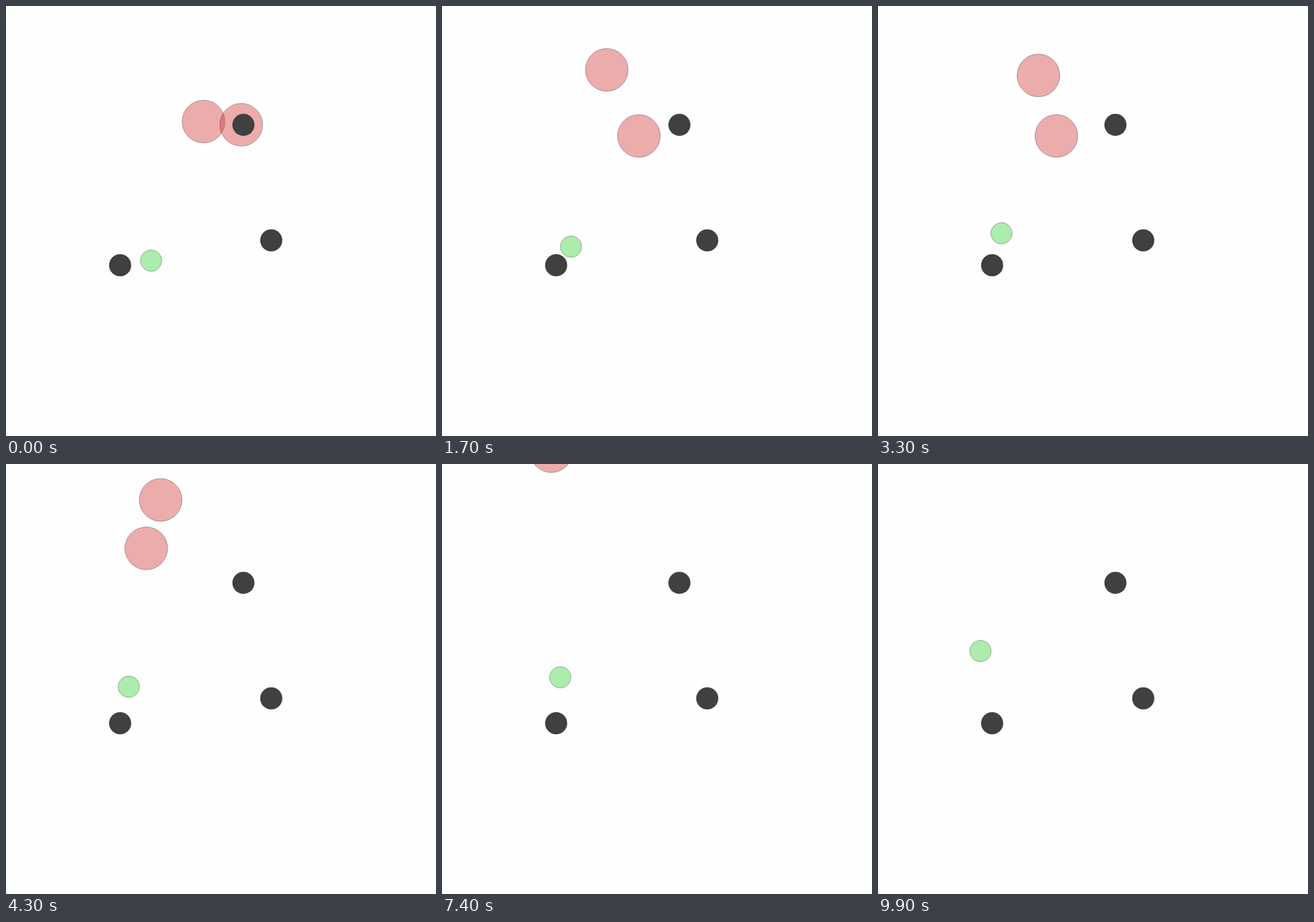
Recreate the animation shown at these times as an HTML page. Size 700 by 700 pixels, loop 10 s.

```html
<!DOCTYPE html>
<html lang="en">
<head>
<meta charset="utf-8">
<title>Drifting circles</title>
<style>
  html, body { margin: 0; width: 100%; height: 100%; overflow: hidden; background: #fefefe; }
  svg { display: block; width: 100vw; height: 100vh; }
  .ball { stroke: #000; stroke-opacity: .33; fill-opacity: .4; }
  .red { fill: #d03030; }
  .green { fill: #30d030; }
  .post { fill: #404040; }
</style>
</head>
<body>
<svg viewBox="0 0 700 700">
  <circle class="ball red" r="34.8"/>
  <circle class="ball red" r="34.8"/>
  <circle class="ball green" r="17.3"/>
  <circle class="post" cx="185.8" cy="422" r="18"/>
  <circle class="post" cx="386.5" cy="193.4" r="18"/>
  <circle class="post" cx="431.8" cy="381.5" r="18"/>
</svg>
<script>
const LOOP = 10000, STEP = 100;

// All balls turn at the same steps; a path that ends early has left the stage.
const turns = [0, 17, 25, 33, 43, 58, 74, 88, 99];
const paths = [
  [[321.5, 188.2], [268.2, 104], [264, 115], [261.2, 113], [251.7, 58.5], [210, -18], [190, -80]],
  [[383, 193.3], [320.5, 211.5], [345, 213], [290.4, 211.5], [228.3, 137.3], [223.3, 45.5],
   [178, -21], [151, -18], [145, -75]],
  [[236.2, 414.5], [210, 391.8], [205, 383], [201, 370], [199.9, 362.6], [208, 362],
   [192.5, 347.2], [188.5, 311.5], [166.8, 304.5]]
];
const balls = document.querySelectorAll('.ball');

function locate(path, step) {
  const i = Math.max(1, turns.findIndex(turn => turn >= step));
  const to = path[i] || path.at(-1), from = path[i - 1] || to;
  const k = (step - turns[i - 1]) / (turns[i] - turns[i - 1]);
  return from.map((start, axis) => start + (to[axis] - start) * k);
}

function draw() {
  const step = Math.floor(performance.now() % LOOP / STEP);
  balls.forEach((ball, i) => {
    const [x, y] = locate(paths[i], step);
    ball.setAttribute('cx', x);
    ball.setAttribute('cy', y);
  });
  requestAnimationFrame(draw);
}
draw();
</script>
</body>
</html>
```
